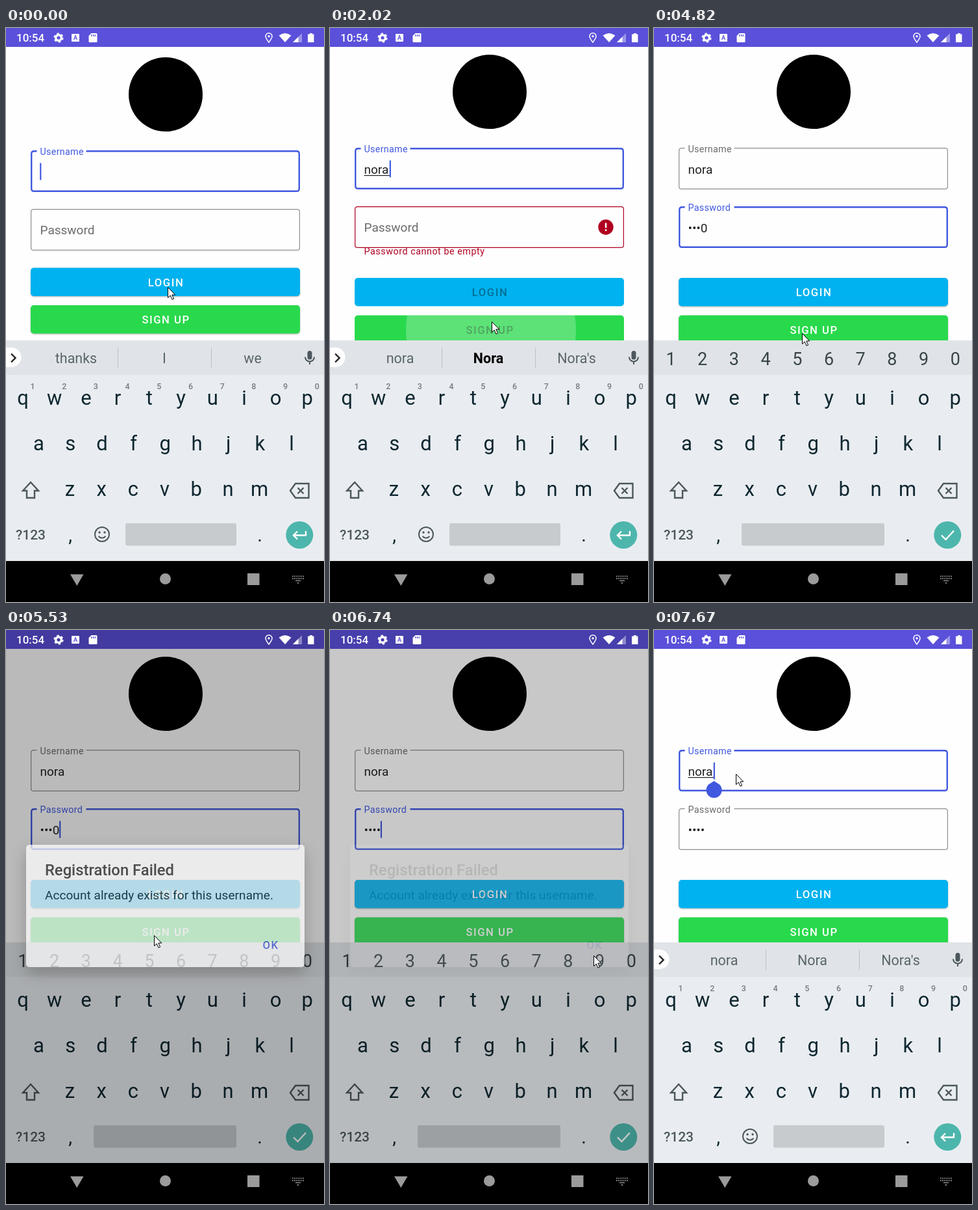
An HTML page for the animation above (8 s loop, 490 px wide and 882 px high).

```html
<!DOCTYPE html>
<html lang="en">
<head>
<meta charset="utf-8">
<title>Login form</title>
<style>
  html, body { margin: 0; width: 100%; height: 100%; overflow: hidden; background: #fefefe; }
  svg { display: block; width: 100%; height: 100%; }
  text { font-family: Roboto, "Noto Sans", sans-serif; white-space: pre; }
  .mid { text-anchor: middle; }
  .med { font-weight: 500; }
  .line { fill: none; stroke: #4c575d; stroke-width: 2.4; }
  .raised { filter: drop-shadow(0 1.6px 1.2px rgba(0, 0, 0, .3)); }
  .floating { filter: drop-shadow(0 9px 12px rgba(0, 0, 0, .32)); }
</style>
</head>
<body>
<svg viewBox="0 0 490 882">
  <rect width="490" height="882" fill="#fefefe"/>
  <clipPath id="signClip"><rect x="38" y="441.5" width="415" height="43.5" rx="4.8"/></clipPath>
  <g id="form"></g>
  <g id="keys"></g>
  <g id="wordKeys"></g>
  <g id="passKeys"></g>
  <rect width="490" height="29" fill="#5a50da"/>
  <rect id="dim" width="490" height="819"/>
  <g id="status" fill="#fff">
    <text x="16" y="21.3" font-size="17" class="med">10:54</text>
    <circle cx="81" cy="15" r="4.3" fill="none" stroke="#fff" stroke-width="3.4"/>
    <circle cx="81" cy="15" r="6.4" fill="none" stroke="#fff" stroke-width="2.4" stroke-dasharray="3.3 3.4"/>
    <rect x="101" y="9" width="12" height="12" rx="1"/>
    <text x="107" y="18.3" font-size="9" font-weight="700" fill="#5a50da" class="mid">A</text>
    <path d="M131.5 8H139q1.5 0 1.5 1.5V20.5q0 1.5-1.5 1.5H129q-1.5 0-1.5-1.5V12Z"/>
    <path d="M132 10v3m2.7-3v3m2.7-3v3" stroke="#5a50da" stroke-width="1.3"/>
    <path d="M405 22C402 18 400 15.5 400 12.8A5 5 0 0 1 410 12.8C410 15.5 408 18 405 22Z" fill="none" stroke="#fff" stroke-width="1.5"/>
    <circle cx="405" cy="12.7" r="1.7"/>
    <path d="M420.5 11.5Q430 4.500 439.5 11.5L430 22Z"/>
    <path d="M456 8V22H442Z" opacity=".4"/>
    <path d="M450.5 13.5V22H442Z"/>
    <path d="M465 9.5h3V8h4v1.5h2.5V22H465Z"/>
  </g>
  <rect y="819" width="490" height="63"/>
  <g fill="#9b9b9b">
    <path d="M99 839.5H119.5L109.3 857Z"/>
    <circle cx="245.5" cy="846.5" r="8.5"/>
    <rect x="372" y="838" width="18.5" height="18"/>
    <path d="M441 842.5h18m-18 3.5h18" fill="none" stroke="#858585" stroke-width="1.8" stroke-dasharray="1.8 1.4"/>
    <path d="M446 849.3h8" stroke="#858585" stroke-width="1.6"/>
    <path d="M448 852h4l-2 2Z"/>
  </g>
  <g id="dialog">
    <rect class="floating" x="31" y="330" width="429" height="188" rx="4.8" fill="#fff"/>
    <text x="60" y="376.5" font-size="23.8" class="med" fill="#212121">Registration Failed</text>
    <text x="60" y="413.5" font-size="19" letter-spacing=".06" fill="#212121">Account already exists for this username.</text>
    <text x="395.5" y="490" font-size="16.7" letter-spacing="1.5" class="med" fill="#4159df">OK</text>
  </g>
  <path id="cursor" d="M.5.5V16.5L4.2 13 7 19.2 9.6 18 6.8 12H11.8Z" fill="#fff" stroke="#000"/>
</svg>
<script>
const LOOP = 8000, BLUE = '#4159df', RED = '#b00020', GRAY = '#6b6b6b', OUTLINE = '#8e8e8e';
const NAME = 'nora', NAME_ENDS = [53, 63.5, 74.5, 81, 92.5];
const NAME_TIMES = [150, 390, 570, 690];
const PIN_TIMES = [3830, 4110, 4220, 4320], MASK_AT = 5600;
const SUBMIT = 2020, PASS_FOCUS = 3040, RESUBMIT = 5060, NAME_FOCUS = 7500;
const SUGGESTIONS = [
  ['thanks', 'I', 'we'], ['n', 'N', 'no'], ['no', 'No', 'on'],
  ['nor', 'Nor', 'non'], ['nora', 'Nora', "Nora's"]
];
const POINTER = [
  [1570, 249, 398], [1790, 249, 451], [2560, 249, 451], [2700, 173, 314],
  [4380, 173, 314], [4650, 226, 475], [4800, 228, 469], [5830, 228, 469],
  [6050, 300, 358], [6300, 401, 507], [6450, 406, 500], [6820, 406, 500],
  [7360, 126, 221]
];
const DIALOG = [[5495, 0], [5530, .71], [5590, 1], [6670, 1], [6740, .1], [6770, 0]];
const DIM = [[5490, 0], [5530, .27], [5590, .32], [6670, .32], [6740, .21], [6880, 0]];

const $ = id => document.getElementById(id);
const ramp = (t, from, length) => Math.min(1, Math.max(0, (t - from) / length));
const smooth = p => p * p * (3 - 2 * p);
const count = (times, t) => times.filter(at => t >= at).length;

// Values of a keyframe list [[time, ...values], ...] at time t
function track(keys, t, ease = p => p) {
  const next = keys.findIndex(k => k[0] > t);
  if (next < 0) return keys.at(-1).slice(1);
  if (next === 0) return keys[0].slice(1);
  const a = keys[next - 1], b = keys[next];
  const p = ease((t - a[0]) / (b[0] - a[0]));
  return a.slice(1).map((v, i) => v + (b[i + 1] - v) * p);
}

const text = (x, y, size, fill, str, attrs = '') =>
  `<text x="${x}" y="${y}" font-size="${size}" fill="${fill}" ${attrs}>${str}</text>`;
const rect = (x, y, w, h, fill, attrs = '') =>
  `<rect x="${x}" y="${y}" width="${w}" height="${h}" fill="${fill}" ${attrs}/>`;
const row = (chars, x, y, size, fill, cls = 'mid') => [...chars].map((c, i) =>
  text(x + 48.7 * i, y, size, fill, c, `class="${cls}"`)).join('');

// Outlined field whose label slides up into a gap in the border
function field({ y, label, up, error, focused, value, caret, underline, end }) {
  const active = error ? RED : BLUE;
  const color = focused ? active : GRAY;
  const width = focused ? 2.4 : 1.2;
  const gap = 38 * up, inset = width / 2;
  const left = 38 + inset, right = 453 - inset, top = y + inset, bottom = y + 64 - inset;
  const border = `M${85.5 + gap} ${top}H${right - 4}q4 0 4 4V${bottom - 4}q0 4-4 4H${left + 4}q-4 0-4-4V${top + 4}q0-4 4-4H${85.5 - gap}`;
  return `<path d="${border}" fill="none" stroke="${focused || error ? active : OUTLINE}" stroke-width="${width}"/>`
    + text(52.5, y + 39 - 32 * up, 19 - 4.7 * up, color, label, `letter-spacing="${.3 * up}"`)
    + text(52.5, y + 39.5, 19, '#212121', value)
    + (underline ? rect(52.5, y + 42, end - 53, 1.2, '#212121') : '')
    + (focused && caret ? rect(end - .8, y + 19.5, 2.2, 26, BLUE) : '');
}

function button(y, color, label, enabled) {
  return rect(38, y, 415, 43.5, color, `rx="4.8" ${enabled ? 'class="raised"' : ''}`)
    + text(246.5, y + 28, 16.7, enabled ? '#fff' : 'rgba(0,0,0,.38)', label,
      'class="mid med" letter-spacing="1.5"');
}

function ripple(x, t, start, r0) {
  const age = t - start;
  if (age < 0 || age > 310) return '';
  const r = r0 + (225 - r0) * ramp(age, 0, 150);
  return `<circle cx="${x}" cy="464" r="${r}" fill="#fff" opacity="${.24 * (1 - ramp(age, 130, 180))}" clip-path="url(#signClip)"/>`;
}

function errorNote(t) {
  return `<circle cx="425" cy="306" r="11.7" fill="${RED}"/>`
    + rect(423.8, 299.5, 2.5, 7.5, '#fff') + rect(423.8, 309.3, 2.5, 2.6, '#fff')
    + text(52.5, 348 + 6 * ramp(t, SUBMIT + 20, 150), 14.3, RED, 'Password cannot be empty', 'letter-spacing=".55"');
}

function drawForm(t) {
  const shift = t < SUBMIT ? 4 : 0;
  const onName = t < PASS_FOCUS || t >= NAME_FOCUS;
  const error = t >= SUBMIT && t < PIN_TIMES[0];
  const typed = count(NAME_TIMES, t);
  const pins = count(PIN_TIMES, t);
  const masked = t >= MASK_AT;
  const pin = pins ? '•'.repeat(pins - 1) + (masked ? '•' : '0') : '';
  const pinEnd = 53 + 6.4 * pins + (pins && !masked ? 4.3 : 0);

  // The caret blinks from the latest key press or focus, and rests under the dialog
  const woke = [0, ...NAME_TIMES, PASS_FOCUS - 50, ...PIN_TIMES, NAME_FOCUS].filter(at => at <= t).at(-1);
  const caret = (t > 5500 && t < NAME_FOCUS) || Math.floor((t - woke) / 500) % 2 === 0;
  const loginY = shift ? 368.5 : 384;

  $('form').innerHTML = `<circle cx="246" cy="${98 + shift}" r="57"/>`
    + field({
      y: 184 + shift, label: 'Username', up: 1, focused: onName,
      value: NAME.slice(0, typed), end: NAME_ENDS[typed], caret, underline: onName && typed
    })
    + field({
      y: 274 + shift, label: 'Password', up: smooth(ramp(t, PASS_FOCUS - 20, 160)),
      error, focused: !onName, value: pin, end: pinEnd, caret
    })
    + (error ? errorNote(t) : '')
    + button(loginY, '#00b2ef', 'LOGIN', !error)
    + button(loginY + 57.5, '#29d94c', 'SIGN UP', !error)
    + ripple(248, t, SUBMIT, 131) + ripple(228, t, RESUBMIT, 60)
    + (t >= NAME_FOCUS + 60 ? `<path d="M92.5 232L101 237.5A12 12 0 1 1 84 237.5Z" fill="${BLUE}"/>` : '');
}

function drawSuggestions(t) {
  const words = SUGGESTIONS[count(NAME_TIMES, t)];
  const bold = t >= NAME_TIMES[3] && t < PASS_FOCUS;
  $('words').innerHTML = words.map((w, i) => {
    const strong = bold && i === 1;
    return text(108 + 136 * i, 515, 21.5, strong ? '#000' : '#5a656b', w,
      `class="mid" font-weight="${strong ? 700 : 400}"`);
  }).join('');
}

function buildKeyboard() {
  const ink = '#0e2730', soft = '#4c575d', space = '#c7cbce';
  $('keys').innerHTML = rect(0, 480, 490, 53, '#e0e4e8') + rect(0, 533, 490, 286, '#e9edf1')
    + row('qwertyuiop', 26, 578.5, 31, ink)
    + row('asdfghjkl', 50.5, 648.5, 31, ink)
    + row('zxcvbnm', 98.5, 719, 31, ink)
    + text(38, 785.5, 21, soft, '?123', 'class="mid med"')
    + text(99, 788.5, 29, ink, ',', 'class="mid"') + text(391, 788.5, 29, ink, '.', 'class="mid"')
    + '<path class="line" d="M38 698L26 711H32V722H44V711H50Z"/>'
    + '<path class="line" d="M446 700H466.5V722H446L438 711ZM449.5 706.5l9 9m0-9l-9 9"/>'
    + '<circle cx="452.3" cy="779" r="21" fill="#4db6ac"/>';
  $('wordKeys').innerHTML = '<g id="words"></g>'
    + row('1234567890', 41, 555, 12.5, '#757c80', 'mid med')
    + rect(172, 491, 1, 31, '#bcc1c5') + rect(316, 491, 1, 31, '#bcc1c5')
    + rect(-20, 491, 43.5, 30, '#fff', 'rx="15"')
    + '<path class="line" d="M8 500.5L14.5 507 8 513.5" style="stroke:#222"/>'
    + rect(464.5, 496, 7, 13.5, soft, 'rx="3.5"')
    + '<path class="line" d="M461 505.5a7 7 0 0 0 14 0M468 512.5V517" style="stroke-width:2"/>'
    + rect(184, 761, 171, 34.5, space, 'rx="3"')
    + '<circle class="line" cx="148" cy="778" r="11" style="stroke-width:2"/>'
    + `<circle cx="144" cy="775" r="1.7" fill="${soft}"/><circle cx="152" cy="775" r="1.7" fill="${soft}"/>`
    + '<path class="line" d="M142.5 781q5.5 5.5 11 0" style="stroke-width:2"/>'
    + '<path class="line" d="M462 773V779.5H443M449 773.5L443 779.5 449 785.5" style="stroke:#fff"/>';
  $('passKeys').innerHTML = row('1234567890', 26, 517.5, 27, '#39454a')
    + rect(135, 761, 220, 34.5, space, 'rx="3"')
    + '<path class="line" d="M443 779.5L449.5 786 462 772.5" style="stroke:#fff"/>';
}

function draw(t) {
  drawForm(t);
  drawSuggestions(t);
  const digits = t >= PASS_FOCUS + 30 && t < NAME_FOCUS + 60;
  $('wordKeys').style.display = digits ? 'none' : '';
  $('passKeys').style.display = digits ? '' : 'none';
  $('dim').setAttribute('opacity', track(DIM, t)[0]);
  $('dialog').setAttribute('opacity', track(DIALOG, t)[0]);
  $('cursor').setAttribute('transform', `translate(${track(POINTER, t, smooth)})`);
}

let start;
function frame(now) {
  start ??= now;
  draw((now - start) % LOOP);
  requestAnimationFrame(frame);
}
buildKeyboard();
draw(0);
requestAnimationFrame(frame);
</script>
</body>
</html>
```
